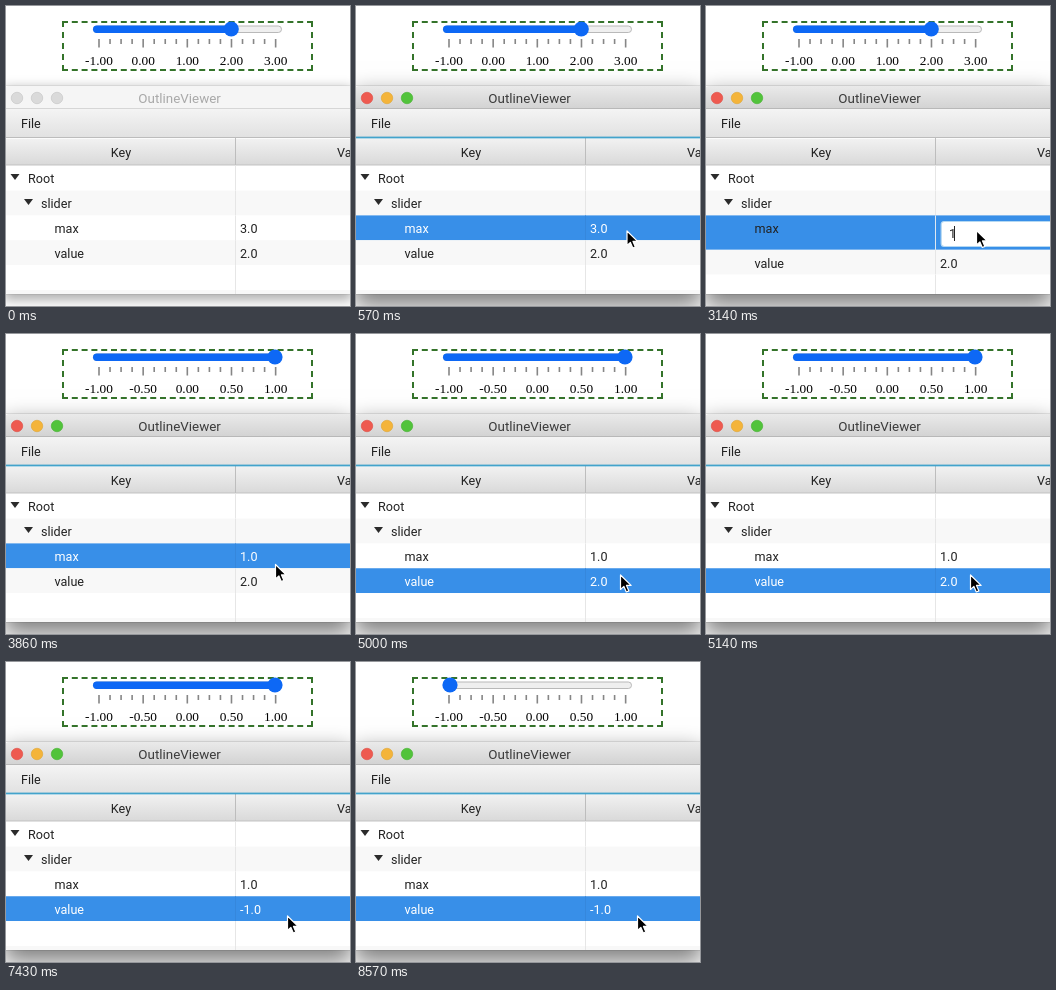
Animation of 344 by 300 pixels, one loop 8710 ms. Source, as an HTML page:

```html
<!DOCTYPE html>
<html lang="en">
<head>
<meta charset="utf-8">
<title>OutlineViewer slider</title>
<style>
  html, body { margin: 0; width: 100%; height: 100%; overflow: hidden; background: #fff; }
  #stage { position: relative; width: 100%; height: 100%; overflow: hidden; contain: strict; }
  #widget { position: absolute; left: 56px; top: 15px; width: 251px; height: 50px;
    box-sizing: border-box; border: 2px dashed #34732a; }
  #shadow { position: absolute; left: 0; top: 80px; width: 100%; height: 208px;
    box-shadow: 0 0 1px rgba(0,0,0,.35), 0 4px 11px 2px rgba(0,0,0,.32); }
  #shadow.active { box-shadow: 0 0 1px rgba(0,0,0,.5), 0 10px 22px 2px rgba(0,0,0,.5); }
  svg { position: absolute; left: 0; top: 0; width: 100%; height: 100%; overflow: hidden; }
  text { font: 12.6px Roboto, sans-serif; fill: #222; white-space: pre; }
  text.tick { font: 13.33px "Liberation Serif", serif; fill: #000; text-anchor: middle; }
  text.title { font-size: 13.4px; }
  .mid { text-anchor: middle; }
  text.light { fill: #fff; }
</style>
</head>
<body>
<div id="stage">
  <div id="widget"></div>
  <div id="shadow"></div>
  <svg viewBox="0 0 344 300">
    <defs>
      <linearGradient id="bar" x2="0" y2="1"><stop stop-color="#eaeaea"/><stop offset="1" stop-color="#d2d2d2"/></linearGradient>
      <linearGradient id="menu" x2="0" y2="1"><stop stop-color="#f4f4f4"/><stop offset="1" stop-color="#e1e1e1"/></linearGradient>
      <linearGradient id="head" x2="0" y2="1"><stop stop-color="#f2f2f2"/><stop offset="1" stop-color="#d9d9d9"/></linearGradient>
      <clipPath id="frame"><rect x="-2" y="80" width="352" height="208" rx="5"/></clipPath>
      <path id="beamShape" d="M-3 -8.5Q0 -8.5 0 -6V6Q0 8.5 -3 8.5M3 -8.5Q0 -8.5 0 -6M0 6Q0 8.5 3 8.5M-1.5 1.5H1.5"/>
    </defs>
    <g id="slider"></g>
    <g id="window" clip-path="url(#frame)"></g>
    <path id="arrow" d="M0 0V14.5L3.4 11.4L5.8 17L8.4 15.9L6 10.4H10.6Z" stroke="#fff" stroke-width="1.2" stroke-linejoin="round"/>
    <g id="beam" fill="none" stroke-linecap="round">
      <use href="#beamShape" stroke="#fff" stroke-width="2.6"/>
      <use href="#beamShape" stroke="#000" stroke-width="1.2"/>
    </g>
  </svg>
</div>
<script>
const LOOP = 8710, BLUE = '#0d68f5', SELECT = '#388fe8';
const $ = id => document.getElementById(id);

// Each entry adds its changes to the state before it.
const steps = [
  [0, { active: false, selected: '', edit: '', focus: false, marked: false, caret: false, typed: '',
        max: '3.0', value: '2.0', top: 3, thumb: 2, cursor: '' }],
  [140, { cursor: 'arrow', x: 300, y: 264 }],
  [280, { x: 280, y: 236 }],
  [430, { x: 271, y: 225, active: true }],
  [570, { selected: 'max' }],
  [860, { edit: 'max', typed: '3.0' }],
  [1000, { cursor: 'beam', x: 271, y: 228 }],
  [1290, { y: 227.5 }],
  [1430, { y: 227 }],
  [1710, { focus: true }],
  [1860, { marked: true }],
  [2570, { marked: false, caret: true, typed: '' }],
  [2860, { typed: '1' }],
  [3140, { cursor: 'arrow', x: 270.5, y: 224.5 }],
  [3290, { edit: '', focus: false, caret: false, max: '1.0' }],
  [3430, { top: 1, thumb: 1 }],
  [3860, { x: 269.5, y: 230.5 }],
  [4000, { x: 267.5, y: 235 }],
  [4150, { x: 265.5, y: 239 }],
  [4290, { x: 264.5, y: 241 }],
  [5000, { selected: 'value' }],
  [5290, { x: 268, y: 243 }],
  [5430, { x: 274, y: 247 }],
  [5570, { x: 281, y: 252 }],
  [5710, { x: 288, y: 256 }],
  [5860, { edit: 'value', typed: '2.0' }],
  [6000, { focus: true }],
  [6140, { marked: true }],
  [6290, { cursor: 'beam', x: 282, y: 256.5 }],
  [6860, { marked: false, caret: true, typed: '' }],
  [7000, { typed: '-' }],
  [7140, { typed: '-1' }],
  [7430, { cursor: 'arrow', x: 281.5, y: 254, edit: '', focus: false, caret: false, value: '-1.0' }],
  [7570, { thumb: -1 }]
];

const rect = (x, y, w, h, fill, more = '') =>
  `<rect x="${x}" y="${y}" width="${w}" height="${h}" fill="${fill}" ${more}/>`;
const text = (x, y, s, cls = '') => `<text x="${x}" y="${y}" class="${cls}">${s}</text>`;
const disc = (x, y, r, fill, stroke = 'none') =>
  `<circle cx="${x}" cy="${y}" r="${r}" fill="${fill}" stroke="${stroke}" stroke-width=".6"/>`;

function drawSlider({ top, thumb }) {
  const x = 94 + 175 * (thumb + 1) / (top + 1);
  let out = rect(87.5, 20, 188, 6.5, '#efefef', 'rx="3.2" stroke="#b9b9b9"')
    + rect(87, 19.5, x - 87, 7.5, BLUE, 'rx="3.7"') + disc(x, 23, 7.6, BLUE);
  for (let i = 0; i <= 16; i++) {
    const tx = 93 + i * 11.04, major = i % 4 === 0;
    out += rect(tx - .8, 33, 1.6, major ? 8.5 : 5, '#868686');
    if (major) out += text(tx, 58.5, (-1 + (top + 1) * i / 16).toFixed(2), 'tick');
  }
  return out;
}

function drawField(s, y) {
  let out = rect(235.2, y + 6.1, 130, 25, '#fff', `rx="3" stroke="${s.focus ? '#b4d8f2' : '#9db3c6'}" stroke-width="1.2"`);
  if (s.marked) out += rect(242.5, y + 9.3, 19.5, 18, '#2f83c4');
  out += text(243, Math.round(y + 22.7), s.typed, s.marked ? 'light' : '');
  if (s.caret) out += rect([243, 248, 254][s.typed.length], y + 10.6, 1, 15, '#222');
  return out;
}

function drawRows(s) {
  const rows = [['Root', 22], ['slider', 35], ['max', 48.5], ['value', 48.5], ['', 0], ['', 0]];
  let y = 159.7, out = '';
  rows.forEach(([key, x], i) => {
    const chosen = key && key === s.selected, editing = key && key === s.edit;
    const h = editing ? 34.4 : 24.85, cls = chosen && !s.focus ? 'light' : '';
    const base = Math.round(y + 17.7);
    const divider = !chosen ? '#e6e6e6' : s.focus ? '#dfe8f1' : '#3587dc';
    out += rect(0, y, 350, h, chosen ? SELECT : i % 2 ? '#f8f8f8' : '#fff')
      + rect(229, y, 1, h, divider) + text(x, base, key, cls);
    if (i < 2) out += `<path d="M${[4.5, 18][i]} ${base - 9}h9l-4.5 6z" fill="#2b2b2b"/>`;
    if (editing) out += drawField(s, y);
    else if (key in s) out += text(234, base, s[key], cls);
    y += h;
  });
  return out;
}

function drawWindow(s) {
  const lights = s.active ? ['#ee5a50', '#f4b43a', '#52c33b'] : ['#dadada', '#dadada', '#dadada'];
  const edges = s.active ? ['#de4b42', '#e0a431', '#44b030'] : ['#c3c3c3', '#c3c3c3', '#c3c3c3'];
  return rect(-2, 80, 352, 220, '#fff')
    + rect(-2, 80, 352, 23, s.active ? 'url(#bar)' : '#f5f5f5')
    + rect(-2, 102, 352, 1, s.active ? '#b8b8b8' : '#d6d6d6')
    + lights.map((c, i) => disc(11 + 20 * i, 92, 5.75, c, edges[i])).join('')
    + `<text x="173.6" y="97" class="title mid" style="fill:${s.active ? '#3c3c3c' : '#a9a9a9'}">OutlineViewer</text>`
    + rect(-2, 103, 352, 29, 'url(#menu)') + text(15, 122, 'File')
    + rect(-2, 132, 352, 27, 'url(#head)') + rect(-2, 132, 352, 1, '#fbfbfb')
    + rect(-2, 158.5, 352, 1.2, '#c2c2c2') + rect(229, 132, 1, 27, '#bdbdbd')
    + (s.active && !s.focus ? rect(-2, 130.6, 352, 1.8, '#43a3cb') : rect(-2, 131, 352, 1, '#bcbcbc'))
    + text(115, 151, 'Key', 'mid') + text(331, 151, 'Value')
    + drawRows(s);
}

let shown = 0;
function frame(now) {
  const t = now % LOOP, count = steps.filter(([start]) => start <= t).length;
  if (count !== shown) {
    shown = count;
    const s = Object.assign({}, ...steps.slice(0, count).map(step => step[1]));
    $('shadow').className = s.active ? 'active' : '';
    $('slider').innerHTML = drawSlider(s);
    $('window').innerHTML = drawWindow(s);
    for (const id of ['arrow', 'beam']) {
      $(id).style.display = s.cursor === id ? '' : 'none';
      $(id).setAttribute('transform', `translate(${s.x || 0} ${s.y || 0})`);
    }
  }
  requestAnimationFrame(frame);
}
frame(performance.now());
</script>
</body>
</html>
```
